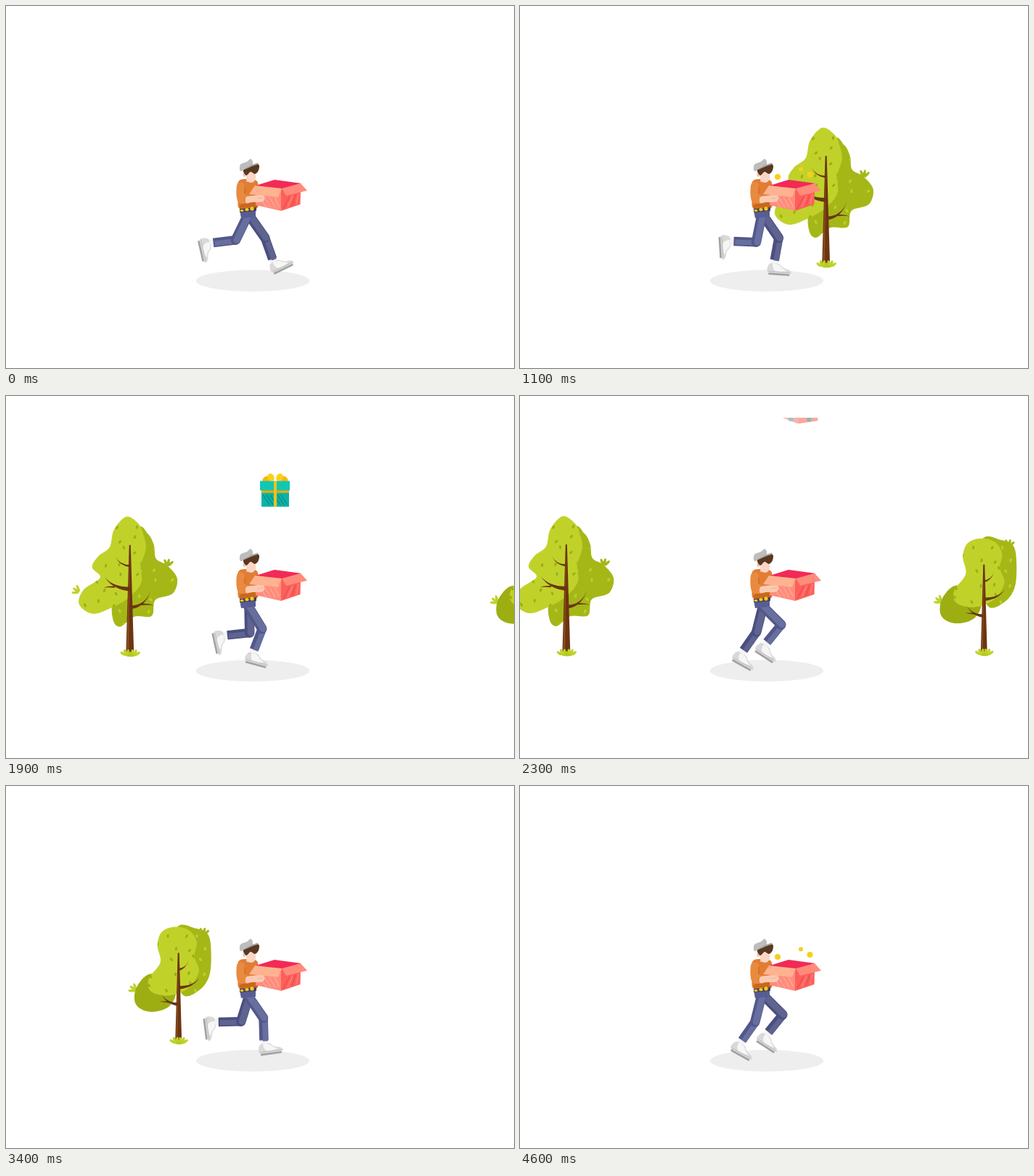
An HTML page with a canvas that plays this animation: 700x500 px, repeating every 4700 ms.

```html
<!DOCTYPE html>
<html lang="en">
<head>
<meta charset="utf-8">
<title>Running with gifts</title>
<style>
html, body { margin: 0; width: 100%; height: 100%; overflow: hidden; background: #fff; }
canvas { display: block; }
</style>
</head>
<body>
<canvas id="stage" width="700" height="500"></canvas>
<script>
const c = document.getElementById('stage').getContext('2d');
const LOOP = 4700, STEP = 100, STRIDE = 517, DEG = Math.PI / 180;
const clamp = (v, lo = 0, hi = 1) => Math.max(lo, Math.min(hi, v));
const mix = (a, b, k) => a + (b - a) * k;
const wrap = v => v - Math.floor(v);

// ---- drawing helpers; points are flat lists x, y, x, y ...
function poly(color, ...p) {
  c.beginPath();
  for (let i = 0; i < p.length; i += 2) c.lineTo(p[i], p[i + 1]);
  c.fillStyle = color;
  c.fill();
}
// closed smooth curve through the points
function blob(color, ...p) {
  const n = p.length, path = new Path2D();
  const q = i => p[(i + n) % n];
  path.moveTo(p[0], p[1]);
  for (let i = 0; i < n; i += 2)
    path.bezierCurveTo(
      q(i) + (q(i + 2) - q(i - 2)) / 6, q(i + 1) + (q(i + 3) - q(i - 1)) / 6,
      q(i + 2) - (q(i + 4) - q(i)) / 6, q(i + 3) - (q(i + 5) - q(i + 1)) / 6,
      q(i + 2), q(i + 3));
  c.fillStyle = color;
  c.fill(path);
  return path;
}
function oval(color, x, y, rx, ry = rx, turn = 0) {
  c.beginPath();
  c.ellipse(x, y, rx, ry, turn, 0, 7);
  c.fillStyle = color;
  c.fill();
}
function line(color, width, x0, y0, x1, y1) {
  c.beginPath();
  c.moveTo(x0, y0);
  c.lineTo(x1, y1);
  c.strokeStyle = color;
  c.lineWidth = width;
  c.stroke();
}
function rect(color, x, y, w, h) {
  c.fillStyle = color;
  c.fillRect(x, y, w, h);
}
function at(x, y, turn, draw) {
  c.save();
  c.translate(x, y);
  c.rotate(turn);
  draw();
  c.restore();
}

// ---- trees
const LIGHT = '#c0d22a', DARK = '#a5b717', BARK = '#6b3511';
// leaf marks on a jittered grid, cut off at the canopy's edge
function leaves(canopy, color, x0, y0) {
  let seed = 7;
  const random = () => (seed = seed * 16807 % 2147483647) / 2147483647;
  c.save();
  c.clip(canopy);
  for (let y = y0; y < y0 + 150; y += 18)
    for (let x = x0; x < x0 + 145; x += 24)
      oval(color, x + random() * 16, y + random() * 12, 1.6, 2.7, random() * 2 - 1);
  c.restore();
}
function tuft(color, x, y, turn, size = 5) {
  at(x, y, turn, () => {
    for (const s of [-1, 0, 1]) oval(color, s * 3.5, -size + Math.abs(s), 1.8, size, s * 0.6);
  });
}
function trunk(x, top, base, w) {
  poly(BARK, x - 1, top, x + 1, top, x + w, base, x - w, base);
  poly('#8b4d1d', x - 0.5, top + 20, x, top + 20, x - w / 3, base, x - w + 1, base);
  oval('#b3cb20', x + 1, base, w + 3.5, 3.5);
  tuft(LIGHT, x - w, base + 1, -0.3, 4);
  tuft(LIGHT, x + w + 1, base + 1, 0.3, 4);
}
// a tapering branch that bends upwards
function branch(x, y, dx, dy, w) {
  c.beginPath();
  c.moveTo(x, y - w);
  c.quadraticCurveTo(x + dx * 0.7, y - w, x + dx, y + dy);
  c.quadraticCurveTo(x + dx * 0.7, y, x, y + w);
  c.fillStyle = BARK;
  c.fill();
}
function tallTree() {
  tuft(DARK, 223, 234, 0.2);
  tuft(LIGHT, 101, 270, -1);
  leaves(blob(DARK, 180, 185, 196, 190, 204, 205, 207, 224, 222, 233, 236, 251, 230, 272,
    206, 281, 201, 303, 177, 304, 157, 318, 147, 305, 150, 270), '#bccf30', 148, 180);
  leaves(blob(LIGHT, 166, 166, 183, 176, 190, 192, 193, 210, 186, 234, 187, 256, 172, 276,
    147, 291, 120, 300, 101, 287, 107, 267, 130, 250, 119, 236, 127, 221, 143, 208, 149, 184),
    '#9daf16', 100, 172);
  trunk(171, 205, 356, 5.5);
  branch(171, 234, -20, -13, 1.5);
  branch(171, 266, -35, -17, 3);
  branch(150, 263, -15, 1, 1.2);
  branch(173, 291, 27, -23, 2.5);
  branch(187, 287, 17, 2, 1.2);
}
function roundTree() {
  tuft(DARK, 676, 207, 0.25);
  tuft(LIGHT, 583, 284, -0.9);
  blob('#9dae13', 600, 262, 584, 280, 582, 300, 593, 311, 611, 313, 630, 305, 638, 285, 620, 265);
  leaves(blob(DARK, 640, 197, 665, 198, 683, 207, 687, 235, 684, 265, 670, 284, 648, 290, 635, 250),
    '#bccf30', 640, 200);
  leaves(blob(LIGHT, 637, 196, 657, 201, 667, 217, 664, 237, 670, 258, 655, 281, 628, 291,
    604, 285, 601, 268, 617, 245, 613, 222, 619, 203), '#9daf16', 600, 200);
  trunk(642, 232, 355, 4.5);
  branch(642, 255, 14, -13, 1.5);
  branch(643, 280, 28, -14, 2.2);
  branch(641, 303, -23, -15, 2.2);
  branch(630, 300, -14, -1, 1.2);
}
// x glides from mid + reach to mid - reach on a sine ease, crossing mid at the given time
const trees = [
  { draw: tallTree, home: 172, mid: 694, reach: 884, rate: 0.0004, time: 320 },
  { draw: roundTree, home: 642, mid: 346, reach: 444, rate: 0.00088, time: 3120 }
];
function drawTrees(t) {
  for (const { draw, home, mid, reach, rate, time } of trees) {
    const angle = clamp((t - time) * rate, -Math.PI / 2, Math.PI / 2);
    const dx = mid - reach * Math.sin(angle) - home;
    at(dx, dx * 0.0055 + 0.7, 0, draw);
  }
}

// ---- gifts, drawn with the origin at the top centre
function tealGift() {
  for (const s of [-1, 1]) {
    oval('#f3b90c', s * 12, 8, 6, 4.5, s * 0.5);
    oval('#fdd017', s * 6, 5, 4.5, 5.5, s * 0.5);
  }
  rect('#0bb3a6', -19, 22, 38, 23.5);
  for (let x = -17; x < 12; x += 5) line('#078e8d', 1.3, x, 29, x + 9, 43);
  rect('#12c6b6', -21, 10, 41, 13);
  rect('#dcae16', -19, 23, 38, 3.5);
  rect('#efc318', -2, 10, 4, 35.5);
}
function blueGift() {
  rect('#0a5c9c', -23, 21, 47, 20.5);
  for (let x = -20; x < 22; x += 8) line('#084d87', 1.2, x, 25, x + 5, 38);
  rect('#0879b4', -25, 14, 50, 7);
  rect('#083f70', -23, 20, 47, 2);
  rect('#1bc3b4', -4, 14, 8, 27.5);
  for (const s of [-1, 1]) {
    poly('#13b8a9', 0, 13, s * 9, 30, s * 15, 24);
    oval('#20d3bd', s * 7, 5, 4, 7, s * 0.7);
    oval('#20d3bd', s * 11, 12, 8, 4);
  }
  oval('#5be2d0', 0, 13, 5, 4);
}
function salmonGift() {
  poly('#fb7068', -24, 17, -3, 21, -3, 54, -24, 46);
  poly('#f2604f', -3, 21, 24, 17, 24, 50, -3, 54);
  for (const [x, color] of [[-13, '#4fd3de'], [12, '#35cbbd']]) {
    rect(color, x - 3, 15, 6, 36);
    for (const s of [-1, 1]) oval(color, x + s * 6, 9, 7, 4, s * -0.5);
    oval(color, x, 4, 3, 6);
  }
}
// time: moment the top edge passes y = 36; speed in px per ms
const gifts = [
  { draw: tealGift, time: 300, speed: 0.357 },
  { draw: tealGift, time: 1700, speed: 0.357 },
  { draw: salmonGift, time: 2462, speed: 0.32 },
  { draw: blueGift, time: 3800, speed: 0.357 }
];
function drawGifts(t) {
  c.save();
  c.beginPath();
  c.rect(0, 30, 700, 470);
  c.clip();
  for (const { draw, time, speed } of gifts) {
    const age = t - time, y = 36 + age * speed;
    c.globalAlpha = Math.min(clamp((y + 60) / 80), clamp((250 - y) / 70));
    if (c.globalAlpha > 0) at(371 + Math.max(0, 107 - y) * 0.125, y, 0, draw);
    c.globalAlpha = 1;
    if (age >= 700 && age <= 900) sparkle(clamp((age - 600) / 200));
  }
  c.restore();
}
function sparkle(k) {
  for (const [dx, dy, r] of [[-22, -10, 4], [10, -20.5, 3], [22.5, -13, 4]])
    oval('#f7cf1b', 377 + dx * k, 246 + dy * k, r * k);
}

// ---- runner: phase, thigh swung forwards, shin swung backwards (degrees)
const stride = [
  [0.05, 35, -20], [0.22, 34, 20], [0.34, -14, 35], [0.5, -14, 35],
  [0.55, -26, 83], [0.7, -9, 94], [0.84, 45, 39], [1, 45, 39], [1.05, 35, -20]
];
function shoe() {
  rect('#f4f4f4', -5, 0, 10, 7);
  blob('#d9d9d9', -7, 6, 0, 5, 7, 5, 13, 10, 22, 13, 22, 18, -7, 18);
  blob('#f6f6f6', -2, 6, 6, 6, 12, 11, 17, 14, 2, 15);
  rect('#a2a2a2', -7, 18, 29, 2.6);
  rect('#bdbdbd', -7, 15.5, 29, 1);
}
function leg(phase, hipX, main, shade) {
  const u = wrap(phase - 0.05) + 0.05;
  const i = stride.findIndex((key, n) => n && u <= key[0]);
  const a = stride[i - 1], b = stride[i], k = (u - a[0]) / (b[0] - a[0]);
  const thigh = mix(a[1], b[1], k) * DEG, shin = mix(a[2], b[2], k) * DEG;
  const hipY = 289;
  const kneeX = hipX + 38 * Math.sin(thigh), kneeY = hipY + 38 * Math.cos(thigh);
  const footX = kneeX - 31 * Math.sin(shin), footY = kneeY + 31 * Math.cos(shin);
  at(footX, footY, shin - 6 * DEG, shoe);
  c.lineCap = 'butt';
  line(shade, 12.5, kneeX, kneeY, footX, footY);
  line(main, 7, kneeX + 2, kneeY + 1, footX + 2, footY + 1);
  c.lineCap = 'round';
  line(shade, 13.5, hipX, hipY, kneeX, kneeY);
  line(main, 9, hipX + 1.5, hipY, kneeX + 1.5, kneeY);
  c.lineCap = 'butt';
}
function drawLegs(t) {
  const phase = (t - 2300) / STRIDE;
  leg(phase + 0.5, 335, '#5e648f', '#4b4e80');
  leg(phase, 333, '#676f9f', '#52578a');
}
function drawBody() {
  poly('#575d93', 322, 282, 344, 281, 344, 291, 324, 293);
  blob('#e07d33', 320, 243, 331, 239, 346, 242, 347, 260, 346, 279, 322, 280, 320, 262);
  poly('#c9671d', 333, 270, 346, 270, 346, 278, 322, 279, 322, 275);
  poly('#4a3f57', 322, 280, 345, 278, 345, 283, 322, 285);
  for (let i = 0; i < 3; i++) oval('#f6cd1a', 325 + i * 7, 282.5 - i * 1.3, 2.6, 1.6 + i * 0.5);
  // head
  rect('#f3b9a4', 331, 235, 9, 8);
  oval('#fbd5c5', 337.5, 236, 6.8, 8);
  oval('#f4bfab', 328.5, 233, 2, 3);
  blob('#593820', 327, 226, 337, 220, 348, 219, 348, 227, 343, 232, 337, 229, 331, 234);
  blob('#bdbdbd', 323, 228, 323, 219, 332, 215, 337, 211, 340, 215, 339, 220, 331, 224);
  poly('#a3a3a3', 324, 228, 337, 220, 347, 216.5, 348, 218.5, 340, 221);
}
function drawBox() {
  poly('#f12a56', 344, 248, 370, 240, 407, 245, 379, 254);
  poly('#ff8c7d', 344, 257, 379, 252, 379, 283, 344, 275);
  poly('#fd605b', 379, 252, 406, 254, 405.5, 274, 379, 283);
  for (let i = 0; i < 4; i++) {
    line('#ffaa98', 1.2, 349 + i * 7, 264, 359 + i * 6, 278);
    line(i % 2 ? '#ff8277' : '#e94c50', 1.4, 382 + i * 6, 280 - i * 2, 391 + i * 4, 263 - i);
  }
  poly('#ffb28f', 343, 248, 380, 252, 375, 264, 335, 260);
  poly('#ff8b7b', 380, 252, 406, 245, 415, 255, 386, 262);
}
function drawArm() {
  blob('#e88a3f', 318, 248, 323, 243, 329, 247, 329, 259, 334, 263, 333, 272, 322, 272, 318, 265);
  line('#c9671d', 1, 329, 250, 329, 260);
  blob('#fbc9b2', 331, 264, 340, 262, 355, 262, 354, 270, 340, 271, 331, 272);
  line('#efa98f', 0.8, 346, 266, 354, 265);
}

function frame(now) {
  const t = Math.floor(now % LOOP / STEP) * STEP;
  rect('#fff', 0, 0, 700, 500);
  oval('#eee', 340, 379.5, 78, 15);
  drawTrees(t);
  drawLegs(t);
  drawBody();
  drawBox();
  drawGifts(t);
  drawArm();
  requestAnimationFrame(frame);
}
frame(0);
</script>
</body>
</html>
```
